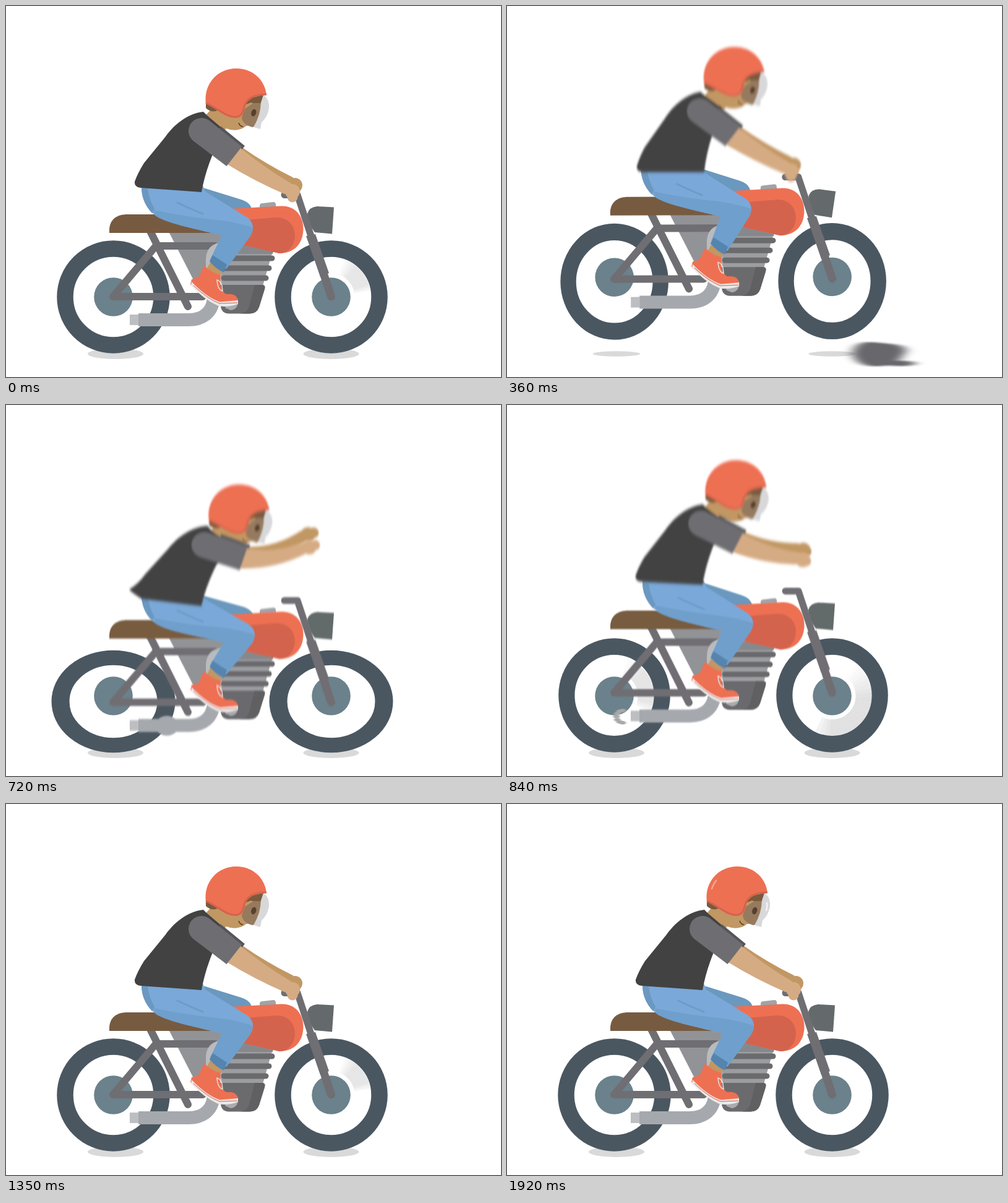
An HTML page for the animation above (1.95 s loop, 800 by 600 pixels).

```html
<!DOCTYPE html>
<html lang="en">
<head>
<meta charset="utf-8">
<title>Motorbike ride</title>
<style>
html, body { margin: 0; width: 100%; height: 100%; overflow: hidden; background: #fff; }
svg { display: block; width: 100vw; height: 100vh; }
.frame { stroke: #6f6e73; stroke-width: 12; fill: none; stroke-linecap: round; }
.tire { fill: none; stroke: #4a5761; stroke-width: 26.5; }
.hub { fill: #6b818b; }
.fin { stroke: #6b6b6e; stroke-width: 9; stroke-linecap: round; }
.pipe { fill: none; stroke: #a5a9ae; stroke-width: 21; }
.shine { fill: none; stroke: #f5a794; stroke-width: 2.5; stroke-linecap: round; }
</style>
</head>
<body>
<svg viewBox="0 0 800 600" xmlns="http://www.w3.org/2000/svg">
  <defs>
    <filter id="bikeBlur" filterUnits="userSpaceOnUse" x="0" y="0" width="800" height="600"><feGaussianBlur/></filter>
    <filter id="riderBlur" filterUnits="userSpaceOnUse" x="0" y="0" width="800" height="600"><feGaussianBlur/></filter>
    <filter id="rockBlur" x="-50%" y="-50%" width="200%" height="200%"><feGaussianBlur stdDeviation="9 1.3"/></filter>
    <filter id="puffBlur" x="-50%" y="-50%" width="200%" height="200%"><feGaussianBlur stdDeviation="1.6 .6"/></filter>
  </defs>

  <ellipse class="shadow" cx="177" cy="562.5" fill="#d9d9d9"/>
  <ellipse class="shadow" cx="525.5" cy="562.5" fill="#d9d9d9"/>
  <g id="glow"></g>
  <g id="wheels">
    <g class="spot" data-x="173.5"><circle class="tire" r="78"/></g>
    <g class="spot" data-x="525.5"><circle class="tire" r="78"/></g>
  </g>
  <g id="hubs">
    <circle class="hub" cx="173.5" cy="470.5" r="31.3"/>
    <circle class="hub" cx="525.5" cy="470.5" r="31.3"/>
  </g>

  <g class="blurBike"><g class="bike">
    <path d="M263 365H362L335 425 324 446 305 447Z" fill="#929397"/>
    <path class="frame" d="M173 470L244 386M173 470H318M246 388H338"/>
    <path class="frame" d="M230 358L294 486" stroke-width="13"/>
    <g id="engine">
      <path class="pipe" d="M336 410V466C336 496 318 507.500 295 507.500H214"/>
      <ellipse id="bulge" cy="508" fill="#a5a9ae"/>
      <path d="M200 499H214V516H200Z" fill="#bcbec1"/>
      <path d="M350 382C330 384 323 395 323 412V446H350Z" fill="#b9bbbe"/>
      <path d="M347 386H434L414 456H348Z" fill="#9c9da1"/>
      <path d="M347 386H434L431 401H347Z" fill="#87888c"/>
      <path class="fin" d="M352 408H430M352 424H425M352 440H420"/>
      <path d="M346 451H414Q420 451 418 458L409 487Q405 497.500 394 497.500H360Q348 497 347 485Z" fill="#6b6b6e"/>
      <path d="M402 451H414Q420 451 418 458L409 487Q405 497.500 394 497.500H378Q389 497 393 486Z" fill="#606063"/>
    </g>
  </g></g>
  <path id="farLeg" class="blurBike" fill="#6b98be"/>
  <g class="blurBike"><g class="bike">
    <path d="M410 328V323Q410 319 415 319L432 317Q436 317 436 321L437 328Z" fill="#a0a3a7"/>
    <path d="M362 328L445 323.500C468 323 480.500 340 480.500 361C480 386 464 400 442 400L380 386Z" fill="#ee7052"/>
    <path d="M375 347L435 342C456 341 467 355 467 372C466 388 456 400 442 400L380 386Z" fill="#d4634d"/>
    <path d="M167 367V361C168 345 179 337 196 337H355V367Z" fill="#775b41"/>
    <path id="lamp" d="M487 336Q490 325 503 324L530 325.500 527 368.500 499 366Q488 352 487 336Z" fill="#646a6b"/>
  </g></g>

  <path id="farArm" class="blurRider" fill="#c19763"/>
  <g class="blurBike">
    <path id="leg" fill="#7aa8d8"/>
    <path id="legShade" fill="#6f9fcc"/>
    <path id="pocket" fill="#6b98c0"/>
    <path id="crease" fill="none" stroke="#6c9cc8" stroke-width="3" stroke-linecap="round"/>
  </g>
  <g class="blurBike"><g class="bike">
    <path d="M357 478L375 474Q376 491 363 492L354 488Z" fill="#a9abae"/>
    <path d="M331 413L352 424 345 438 324 426Z" fill="#c19763"/>
    <path d="M334 403L357 418 352 430.500Q341 427 329 413Z" fill="#5584ae"/>
    <path d="M320 420Q335 433 347 435L346 449Q349 463 356 466 374 464 375 478L346 483 298 450 300 442 311 439Z" fill="#ee7052"/>
    <path d="M300 446Q325 472 346 478.500L375 476V482Q358 488 343 485 320 475 299 452Z" fill="#ece8e7"/>
    <path d="M303 452Q326 474 345 481L374 480" fill="none" stroke="#d4634d" stroke-width="1"/>
    <path d="M341 443Q347 445 349 452L350 461Q342 459 341 443Z" fill="none" stroke="#e7dedb" stroke-width="1.500"/>
  </g></g>

  <g class="blurRider">
    <g id="head">
      <path d="M334 164L320 180 350 204 356 198Q370 204 384 197L388 194 400 193 412 178 416 148 385 146Z" fill="#c19763"/>
      <path d="M323 158V165Q330 172 339 170L346 167Z" fill="#7a5a3d"/>
      <path d="M386 160Q391 147 416 144L415 157Q404 161 396 156Z" fill="#7a5a3d"/>
      <path d="M386 166L400 157H412L407 193 398 196Q382 191 381 180Z" fill="#967a5e"/>
      <ellipse cx="400.500" cy="172.500" rx="4" ry="6" transform="rotate(18 400 172)" fill="#57402d"/>
      <path d="M376 189Q378 195 383 195" fill="none" stroke="#57402d" stroke-width="1.600"/>
      <path d="M416 144Q426 150 425 166 422 181 413 188L411 199 400 196Q412 175 412 156Z" fill="#d8d8da"/>
      <path d="M323 158C319 126 342 101 372 101C401 101 419 122 421 144C399 144 389 152 386 165C384 177 379 181 370 181C355 181 345 169 323 158Z" fill="#ee7052"/>
      <path d="M323 156.500C345 167 355 179 370 179.500C379 179 382 175 384.500 164C388 150 399 143 421 143" fill="none" stroke="#d4634d" stroke-width="3"/>
      <g id="shine"><path id="arc" class="shine"/><path class="shine" d="M420 160Q421 167 419 172" style="stroke:#f4f4f4"/></g>
    </g>
    <path id="torso" fill="#424242"/>
  </g>
  <g class="blurBike"><g class="bike">
    <path class="frame" d="M450 305.500H471L494 375" stroke-linejoin="round" style="stroke-width:11"/>
    <path d="M485 372L500 369 522 432 508 438Z" fill="#6f6e73"/>
    <path class="frame" d="M505 408L525.500 470" style="stroke-width:13"/>
  </g></g>
  <g class="blurRider">
    <path id="farSleeve" d="M20-25L70-24V-10H20Z" fill="#55555a"/>
    <path id="arm" fill="#d5ab84"/>
    <path id="sleeve" d="M0-21L67-20V20L0 21A21 21 0 0 1 0-21Z" fill="#6e6d72"/>
  </g>
  <g id="puffs" filter="url(#puffBlur)" fill="#a8a8a8"></g>
  <g id="rock" filter="url(#rockBlur)" fill="#68676c">
    <path d="M-40 0Q-38-19-12-20L18-17Q50-15 46-3L38 8Q22 20-2 20-34 19-40 0Z"/>
    <ellipse cx="38" cy="15" rx="23" ry="4.500"/>
  </g>
</svg>

<script>
const LOOP = 1950, STEP = 30, LANDING = 690;
const $ = id => document.getElementById(id);
const all = sel => document.querySelectorAll(sel);
const set = (el, attrs) => { for (const name in attrs) el.setAttribute(name, attrs[name]); };
const span = (t, a, b) => Math.min(1, Math.max(0, (t - a) / (b - a)));
const ease = (t, a, b) => { const u = span(t, a, b); return u * u * (3 - 2 * u); };
const hump = (t, a, b) => Math.sin(Math.PI * span(t, a, b));
const rad = deg => deg * Math.PI / 180;
const polar = (cx, cy, r, deg) => `${cx + r * Math.cos(rad(deg))} ${cy + r * Math.sin(rad(deg))}`;
const place = ({ x = 0, y = 0, rot = 0 }, cx, cy) => `translate(${x} ${y}) rotate(${rot} ${cx} ${cy})`;

// The whole ride is mixed from these few movements.
function motionAt(t) {
  const s = Math.max(0, t - LANDING);
  const settle = Math.sin(2 * Math.PI * s / 260) * Math.max(0, 1 - s / 450) ** 1.5;
  return {
    crouch: hump(t, 60, 300),
    hop: hump(t, 270, LANDING),
    lift: hump(t, 290, LANDING + 25),
    tilt: ease(t, 330, 560) * (1 - ease(t, 600, LANDING)),
    reach: ease(t, 400, 590) * (1 - ease(t, 720, 980)),
    settle,
    impact: settle * (1 - ease(t, 720, 900)),
    shadow: 1 - ease(t, 240, 480) + ease(t, 640, 700)
  };
}

const bikePose = m => ({ y: 5 * m.crouch - 46 * m.hop + 18 * m.settle, rot: -2.6 * m.tilt, x: 2 * m.tilt });
const headPose = m => ({
  x: -7 * m.lift - 27 * m.tilt + 8 * m.settle,
  y: 13 * m.crouch - 70 * m.lift - 4 * m.tilt + 46 * m.settle,
  rot: -5 * m.lift - 16 * m.tilt - 4 * m.settle
});
const torsoPose = m => ({
  x: 6 * m.lift - 12 * m.tilt,
  y: 10 * m.crouch - 58 * m.lift + 36 * m.settle,
  rot: -8 * m.lift - 1.5 * m.tilt + 5 * m.settle
});

function setBlur(name, height, t) {
  const speed = Math.abs(height(motionAt(t + 8)) - height(motionAt(t - 8))) / 16;
  const amount = Math.min(2.4, speed * 7);
  const filter = amount > .8 ? `url(#${name}Blur)` : "none";
  document.querySelector(`#${name}Blur feGaussianBlur`).setAttribute("stdDeviation", `${amount * .35} ${amount}`);
  all(`.blur${name[0].toUpperCase()}${name.slice(1)}`).forEach(el => set(el, { filter }));
}

function drawBike(m, t) {
  const bike = bikePose(m);
  all(".bike").forEach(g => set(g, { transform: place(bike, 350, 470) }));
  set($("lamp"), { transform: place({ rot: 7 * m.hop }, 488, 345) });
  set($("hubs"), { transform: place({ x: 3 * m.tilt, y: -51 * m.hop - 8 * m.tilt, rot: -2.6 * m.tilt }, 350, 470) });
  set($("wheels"), {
    transform: place({ x: 3 * m.tilt, y: 4 * m.crouch - 40 * m.hop - 4 * m.tilt + 15 * m.impact, rot: -2.8 * m.tilt }, 350, 470)
  });
  const sx = 1 + .04 * m.crouch - .07 * m.hop + .16 * m.impact;
  const sy = 1 - .044 * m.crouch + .05 * m.hop - .155 * m.impact;
  all(".spot").forEach(g => set(g, { transform: `translate(${g.dataset.x} 470.5) scale(${sx} ${sy})` }));
  all(".shadow").forEach(el => set(el, {
    rx: m.shadow > 0 ? 45 * (.7 + .3 * m.shadow) : 0, ry: 8.5 * m.shadow
  }));

  const wave = Math.sin(2 * Math.PI * 19 * t / LOOP);
  set($("engine"), { transform: place({ x: 2 * Math.abs(wave), y: 2.3 * wave + 4 * (m.settle - m.tilt) }) });
  const cx = 340 - (t - 660) * 4 / 3, bulging = cx > 214 && cx < 310;
  set($("bulge"), { cx, rx: bulging ? 19 : 0, ry: bulging ? 16 : 0 });
}

function drawLegs(m) {
  const bike = bikePose(m);
  const shift = (dx, dy) => (x, y) => `${x + dx} ${y + dy} `;
  const hip = shift(-12 * m.tilt - 3 * m.hop, 8 * m.crouch - 48 * m.hop - 6 * m.tilt + 24 * m.settle);
  const knee = shift(-6 * m.hop - 10 * m.tilt + 5 * m.settle, 6 * m.crouch - 48 * m.hop - 10 * m.tilt + 22 * m.settle);
  const foot = shift(bike.x, bike.y);
  const shin = `L${foot(356, 425)}L${foot(330, 410)}L${knee(349, 371)}C${knee(305, 360)}${hip(262, 352)}${hip(243, 340)}`;
  set($("farLeg"), { d: `M${hip(290, 290)}L${hip(322, 295)}L${knee(380, 313)}Q${knee(397, 318)}${knee(398, 333)}L${knee(330, 340)}Z` });
  set($("leg"), { d: `M${hip(219, 288)}L${hip(318, 290)}L${hip(322, 300)}L${knee(385, 339)}C${knee(399, 346)}${knee(403, 358)}${knee(395, 372)}${shin}C${hip(226, 328)}${hip(218, 310)}${hip(219, 288)}Z` });
  set($("legShade"), { d: `M${hip(238, 330)}Q${hip(290, 341)}${knee(350, 347)}Q${knee(376, 351)}${knee(398, 358)}Q${knee(399, 366)}${knee(395, 372)}${shin}Z` });
  set($("pocket"), { d: `M${hip(219, 294)}L${hip(229, 295)}Q${hip(231, 313)}${hip(240, 328)}L${hip(236, 335)}Q${hip(219, 316)}${hip(219, 294)}Z` });
  set($("crease"), { d: `M${hip(277, 318)}Q${hip(300, 329)}${hip(318, 336)}` });
}

function armPath(cx, cy, angle, hx, hy, bend, fx, fy) {
  const px = -Math.sin(rad(angle)) * 17, py = Math.cos(rad(angle)) * 17;
  const len = Math.hypot(hx - cx, hy - cy), dx = (hx - cx) / len, dy = (hy - cy) / len;
  const edge = side => {
    const a = [cx + side * px, cy + side * py];
    const w = [hx - dx * 8 - dy * 10 * side, hy - dy * 8 + dx * 10 * side];
    return { a, w, q: [(a[0] + w[0]) / 2 - dy * bend, (a[1] + w[1]) / 2 + dx * bend] };
  };
  const top = edge(-1), low = edge(1);
  const disc = (x, y, r) => `M${x - r} ${y}a${r} ${r} 0 0 1 ${2 * r} 0a${r} ${r} 0 0 1 ${-2 * r} 0Z`;
  return `M${top.a}Q${top.q} ${top.w}L${low.w}Q${low.q} ${low.a}Z`
    + disc(hx, hy, 12) + disc(hx + fx, hy + fy, 8.5);
}

function drawUpperBody(m) {
  const torso = torsoPose(m), flap = 1.6 * Math.max(0, m.impact);
  set($("head"), { transform: place(headPose(m), 372, 150) });
  set($("torso"), {
    transform: place(torso, 265, 295),
    d: `M319 171C292 174 271 193 258 211L223 254Q213 270 ${208 - 10 * flap} ${284 - 4 * flap}Q${207 - 10 * flap} ${293 - 12 * flap} 218 294L316 301Q321 272 334 240L352 200 325 177Z`
  });

  const c = Math.cos(rad(torso.rot)), s = Math.sin(rad(torso.rot));
  const sx = 265 + torso.x + 51 * c + 93 * s, sy = 295 + torso.y + 51 * s - 93 * c;
  const angle = 38 - 19 * m.reach - 13 * m.tilt;
  const transform = `translate(${sx} ${sy}) rotate(${angle})`;
  set($("sleeve"), { transform });
  set($("farSleeve"), { transform });

  const cx = sx + 66 * Math.cos(rad(angle)), cy = sy + 66 * Math.sin(rad(angle));
  const hx = 463 - 5 * m.hop + 27 * m.reach - 17 * m.tilt;
  const hy = 300 + 6 * m.crouch - 50 * m.hop - 81 * m.reach - 49 * m.tilt + 18 * m.settle;
  const bend = 4 + 10 * m.reach, fx = 9 * m.reach, fy = 9 - 12 * m.reach + 5 * m.tilt;
  const farX = hx + 4 - 6 * m.reach, farY = hy - 10 - 10 * m.reach + 15 * m.tilt;
  set($("arm"), { d: armPath(cx, cy, angle, hx, hy, bend, fx, fy) });
  set($("farArm"), { d: armPath(cx + 1, cy - 2, angle, farX, farY, bend, fx, fy) });
}

// Reflection that sweeps clockwise round the inside of a wheel.
function glowRing(cx, age) {
  if (age < 0 || age > 350) return "";
  const u = span(age, 0, 240);
  const lead = -10 + 205 * (1 - (1 - u) ** 2), trail = -72 + 272 * (age / 350) ** 2;
  const n = 24, size = (lead - trail) / n;
  let out = "";
  for (let i = 0; i < n && size > 0; i++) {
    const k = (i + .5) / n, a = trail + i * size;
    const grey = Math.round(255 - 38 * Math.min(1, k * 3, (1 - k) * 5 + .3) * (.65 + .35 * u));
    out += `<path d="M${polar(cx, 470.5, 51, a)}A51 51 0 0 1 ${polar(cx, 470.5, 51, a + size + .4)}" fill="none" stroke-width="26" stroke="rgb(${grey},${grey},${grey})"/>`;
  }
  return out;
}

function drawGlow(m, t) {
  const start = [1350, 750, 0].find(s => t >= s);
  $("glow").innerHTML = m.hop > .1 ? "" : glowRing(173.5, t - start - 70) + glowRing(525.5, t - start);
}

function drawPuffs(t) {
  const u = span(t, 830, 1140), x = 200 - 145 * u ** .7, r = 8 + 42 * u ** .9;
  let out = "";
  for (let a = 90; a <= 270 && u > 0 && u < 1; a += 30) {
    out += `<ellipse cx="${x + r * Math.cos(rad(a))}" cy="${504 + r * Math.sin(rad(a))}" rx="5.5" ry="2.8"/>`;
  }
  $("puffs").innerHTML = out;
  set($("puffs"), { opacity: Math.min(1, (1 - u) / .4) });
}

function drawShine(t) {
  const k = span(t, 480, 645) + span(t, 1780, 1945), turn = k % 1, mid = 284 - 90 * turn;
  set($("shine"), { opacity: turn > 0 ? 1 : 0 });
  set($("arc"), { d: `M${polar(372, 150, 43, mid - 10)}A43 43 0 0 1 ${polar(372, 150, 43, mid + 10)}` });
}

function draw(t) {
  const m = motionAt(t);
  drawBike(m, t);
  drawLegs(m);
  drawUpperBody(m);
  drawGlow(m, t);
  drawPuffs(t);
  drawShine(t);
  set($("rock"), { transform: place({ x: 598 - 2.217 * (t - 360), y: 563 }, 0, 0) });
  setBlur("bike", n => 18 * n.settle, t);
  setBlur("rider", n => headPose(n).y, t);
}

let begin;
function tick(now) {
  begin ??= now;
  draw(Math.floor(((now - begin) % LOOP) / STEP) * STEP);
  requestAnimationFrame(tick);
}
draw(0);
requestAnimationFrame(tick);
</script>
</body>
</html>
```
